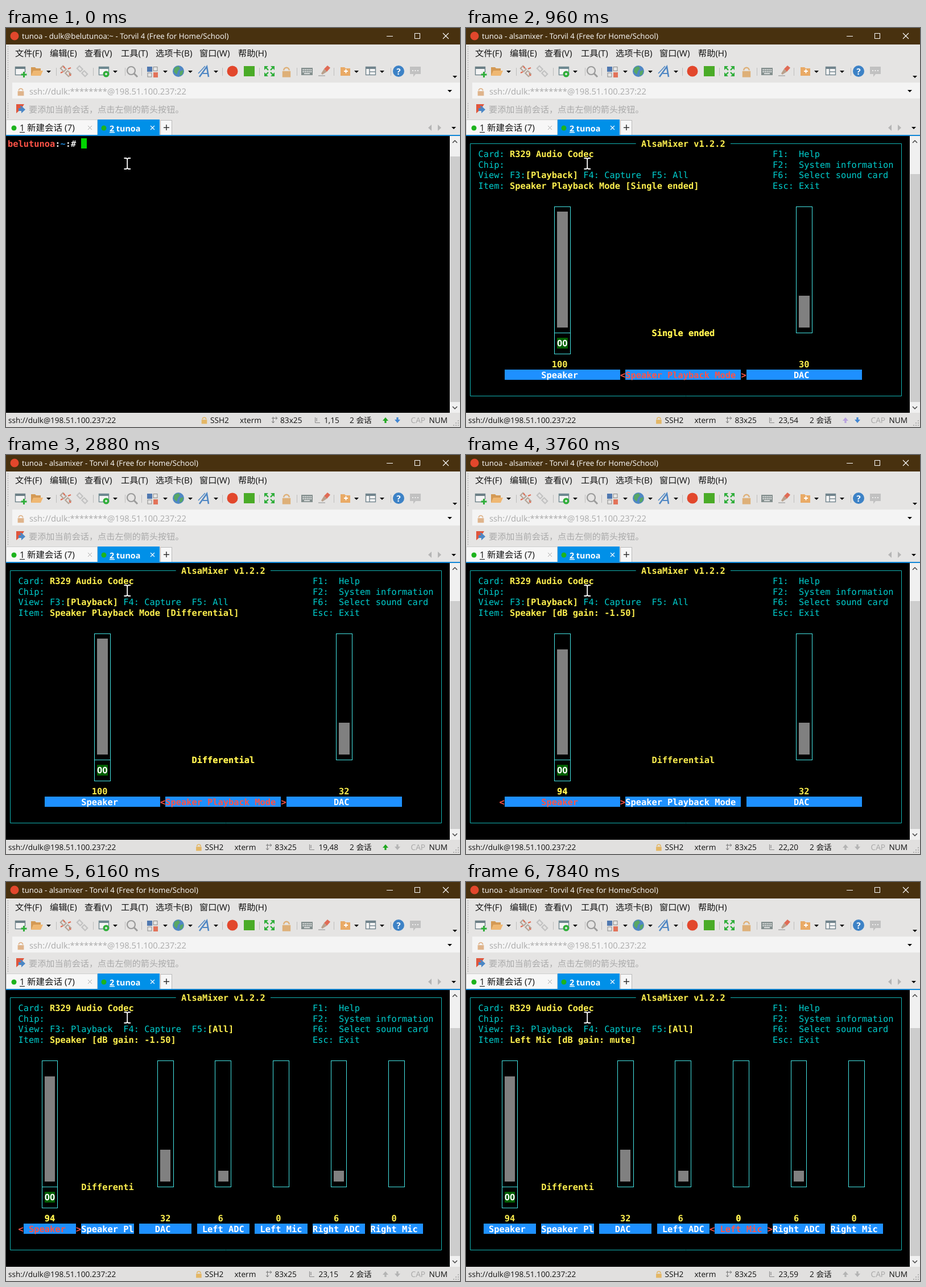
These frames come from a looping animation (798x702 px, 8 s). An HTML page with a canvas:

```html
<!DOCTYPE html>
<html lang="zh-CN">
<head>
<meta charset="utf-8">
<title>Terminal mixer</title>
<style>
html, body { margin: 0; width: 100%; height: 100%; overflow: hidden; background: #000; }
canvas { display: block; }
</style>
</head>
<body>
<canvas id="stage" width="798" height="702"></canvas>
<script>
const g = document.getElementById('stage').getContext('2d');
g.textRendering = 'geometricPrecision';

const LOOP = 8000;
const UI = '"Open Sans", "Noto Sans CJK SC", "Noto Sans CJK", sans-serif';
const MONO = '"DejaVu Sans Mono", monospace';
const USER = 'dulk', HOST = 'belutunoa', SESSION = 'tunoa', ADDR = '198.51.100.237';
const APP = 'Torvil 4 (Free for Home/School)';
const CYAN = '#00cdcd', BAR = '#45e6e6', YELLOW = '#fff04f', RED = '#ff5347', BLUE = '#1e90ff';
const ORANGE = '#e9aa66', GREY = '#8a8a8a', GREEN = '#2fae3a', STEEL = '#4f87c4';

// ---- timeline: each entry is merged over the ones before it ----
const lit = { up: 'green', down: true };
const fade = { up: 'violet', down: true };
const off = { up: '', down: false };
const START = { typed: 0, mixer: false, all: false, sel: 0, speaker: 0, dac: 24, mode: 'Single ended', pos: '1,15', ...lit };
const pick = (sel, pos) => ({ sel, pos: '23,' + pos, ...fade });
const dac = n => ({ dac: n, pos: '22,66', ...lit });
const mode = m => ({ mode: m, pos: '19,48', ...lit });
const EVENTS = [
  [440, { mixer: true, pos: '23,31', ...off }],
  [960, pick(1, 54)], [1080, off],
  [1280, pick(2, 77)], [1360, off],
  [1440, dac(23)], [1520, dac(22)], [1560, off], [1640, dac(21)], [1720, dac(20)], [1760, off],
  [1840, dac(21)], [1920, dac(22)], [2000, { up: '' }], [2040, off],
  [2120, dac(23)], [2200, { up: '' }], [2240, off],
  [2400, pick(1, 54)], [2480, off],
  [2560, mode('Differential')], [2640, off], [2720, mode('Single ended')],
  [2800, mode('Differential')], [2880, { down: false }], [3040, off],
  [3240, pick(0, 31)], [3360, off],
  [3600, { speaker: 1, pos: '22,20', ...lit }], [3680, { speaker: 2 }], [3760, off],
  [5800, { up: 'green' }], [5880, { all: true, pos: '23,15', ...fade }], [6080, { up: '' }], [6160, off],
  [6520, pick(1, 26)], [6640, off], [6800, pick(2, 37)], [6920, off],
  [7480, pick(3, 48)], [7600, off], [7720, pick(4, 59)], [7840, off]
];

function stateAt(t) {
  const s = { ...START };
  for (const [at, change] of EVENTS) if (t >= at) Object.assign(s, change);
  if (t < 440) {
    s.typed = Math.min(9, Math.floor(t / 40));
    s.pos = '1,' + (15 + s.typed);
  }
  return s;
}

// ---- drawing helpers ----
function rect(x, y, w, h, c) { g.fillStyle = c; g.fillRect(x, y, w, h); }
function box(x, y, w, h, c, lw = 1) { g.strokeStyle = c; g.lineWidth = lw; g.strokeRect(x, y, w, h); }
function disc(x, y, r, c) { g.fillStyle = c; g.beginPath(); g.arc(x, y, r, 0, 7); g.fill(); }
function ring(x, y, r, c, lw) { g.strokeStyle = c; g.lineWidth = lw; g.beginPath(); g.arc(x, y, r, 0, 7); g.stroke(); }
function trace(p) {
  g.beginPath();
  for (let i = 0; i < p.length; i += 2) g.lineTo(p[i], p[i + 1]);
}
function line(c, lw, ...p) { trace(p); g.strokeStyle = c; g.lineWidth = lw; g.stroke(); }
function poly(c, ...p) { trace(p); g.fillStyle = c; g.fill(); }
function label(s, x, y, size, c, weight = 400) {
  g.font = `${weight} ${size}px ${UI}`;
  g.fillStyle = c;
  g.fillText(s, x, y);
}
function drop(x, y = 77) { poly('#000', x - 4, y - 2, x + 4, y - 2, x, y + 2); }
function lock(x, y, k, c) {
  rect(x - 6 * k, y - 1 * k, 12 * k, 9 * k, c);
  g.strokeStyle = c; g.lineWidth = 2 * k;
  g.beginPath(); g.arc(x, y - 2 * k, 4 * k, Math.PI, 0); g.stroke();
}
function folder(x, c) {
  poly(c, x - 10, 69, x - 3, 69, x - 1, 71, x + 7, 71, x + 7, 84, x - 10, 84);
}
function pane(x, c) {
  rect(x - 9, 68, 18, 15, '#f4f4f4');
  box(x - 8.5, 68.5, 17, 14, c, 1.4);
  rect(x - 9, 68, 18, 4, c);
}
function chain(x, c) {
  g.save(); g.translate(x, 76); g.rotate(Math.PI / 4);
  box(-10, -3, 8, 6, c, 2.2); box(2, -3, 8, 6, c, 2.2);
  g.restore();
}

// ---- terminal grid ----
const CW = 9.24, RH = 18.5;
const colX = c => 3 + c * CW;
const rowY = r => 203 + r * RH;
const snap = v => Math.floor(v) + 0.5;

function put(s, c, r, color, bold = true) {
  g.font = `${bold ? 'bold ' : ''}15.35px ${MONO}`;
  g.fillStyle = color;
  [...s].forEach((ch, i) => ch !== ' ' && g.fillText(ch, colX(c + i), rowY(r) + 5.5));
}
function cells(c, r, w, h, color) {
  const x = Math.round(colX(c)), y = Math.round(rowY(r) - RH / 2);
  rect(x, y, Math.round(colX(c + w)) - x, Math.round(rowY(r + h) - RH / 2) - y, color);
}

// ---- window chrome ----
function header(title) {
  rect(0, 0, 798, 29, '#48310f');
  disc(15, 14, 7.5, '#e2472c');
  label(title, 28, 18.7, 13.3, '#fff');
  line('#fff', 1, 669, 14.5, 680, 14.5);
  box(718.5, 9.5, 9, 9, '#fff');
  line('#fff', 1.1, 768, 9, 778, 19);
  line('#fff', 1.1, 778, 9, 768, 19);

  rect(0, 29, 798, 161, '#e5e4e3');
  [['文件(F)', 16], ['编辑(E)', 77], ['查看(V)', 138], ['工具(T)', 202],
   ['选项卡(B)', 263], ['窗口(W)', 340], ['帮助(H)', 408]]
    .forEach(([s, x]) => label(s, x, 50, 15.2, '#111'));
  for (let y = 32; y < 158; y += 4) if (y < 92 || y > 128) rect(3, y, 1, 2, '#aaa');
}

function toolbar() {
  for (const x of [88, 153, 209, 238, 380, 445, 511, 576, 676]) rect(x, 70, 1, 14, '#bdbdbd');
  for (const x of [75, 192, 280, 324, 369, 616, 661]) drop(x);
  drop(789, 86);

  pane(25, '#6b7f86');
  rect(27, 78, 9, 9, '#e5e4e3'); rect(30, 77, 3, 10, GREEN); rect(26.5, 80.5, 10, 3, GREEN);
  folder(54, '#d49a55');
  poly('#efb873', 48, 75, 65, 75, 61, 84, 44, 84);
  chain(105, '#b5a79b');
  line('#e26a52', 2, 101, 67, 103, 71); line('#e26a52', 2, 111, 80, 114, 84);
  line('#e26a52', 2, 96, 79, 100, 77); line('#e26a52', 2, 109, 72, 114, 70);
  chain(134, '#c2c2c2');
  pane(172, '#6d8890');
  disc(176, 81, 5.5, GREEN); disc(176, 81, 2, '#e5e4e3');
  ring(220, 75, 7, '#9b9b9b', 2.2); line('#9b9b9b', 3, 225, 80, 231, 86);
  rect(248, 68, 9, 9, '#4f78b0'); box(249, 79, 7, 7, GREY); box(259, 68.5, 7, 7, GREY);
  rect(259, 78, 8, 9, '#e2735a');
  disc(303, 76, 10, STEEL);
  poly('#58a765', 296, 70, 303, 67, 306, 71, 302, 76, 300, 82, 295, 77);
  poly('#58a765', 306, 76, 312, 74, 310, 82, 305, 84);
  line(STEEL, 2.6, 340, 86, 353, 68, 356, 86); line(STEEL, 2, 346, 80, 355, 80);
  line(STEEL, 1.5, 338, 80, 350, 67);
  disc(398, 76, 9.5, '#e2472c');
  rect(418, 67, 19, 18, '#4aab27');

  for (const sx of [-1, 1]) for (const sy of [-1, 1]) {
    const x = 463 + sx * 9, y = 76 + sy * 9;
    poly(GREEN, x, y, x - sx * 7, y, x, y - sy * 7);
    line(GREEN, 2.4, x - sx, y - sy, x - sx * 7, y - sy * 7);
  }
  lock(493, 77, 1.2, '#deb078');
  rect(519, 70, 20, 13, '#85908f');
  for (let i = 0; i < 10; i++) rect(521.5 + i % 5 * 3.4, 72.5 + Math.floor(i / 5) * 3.5, 2, 2, '#f4f4f4');
  rect(524, 79.5, 10, 1.6, '#f4f4f4');
  poly('#e06b55', 559, 72, 565, 66, 570, 70, 564, 77);
  poly('#b9a08c', 559, 72, 564, 77, 556, 82, 554, 80);
  line('#aaa', 1.5, 549, 84, 561, 84);
  folder(598, ORANGE); rect(594, 75, 7, 2, '#fff'); rect(596.5, 72.5, 2, 7, '#fff');
  pane(641, '#71848d'); line('#71848d', 1.4, 639, 70, 639, 83); line('#71848d', 1.4, 639, 77, 649, 77);
  disc(690, 76, 10, '#3d82c6');
  label('?', 686.5, 82, 15, '#fff', 700);
  poly('#c1c1c1', 710, 68, 729, 68, 729, 81, 720, 81, 716, 86, 716, 81, 710, 81);
  for (let i = 0; i < 3; i++) rect(714 + i * 4.5, 74, 2, 2, '#eee');
}

function bars() {
  rect(11, 96, 787, 28, '#f4f4f4');
  lock(26, 112, 0.9, '#dfb48c');
  label(`ssh://${USER}:********@${ADDR}:22`, 41, 116.5, 14.8, '#aaa');
  drop(780, 111);
  poly('#e0563d', 18, 134, 32, 134, 27, 142, 18, 150);
  poly('#4a87c6', 24, 137, 27, 137, 34, 143.5, 27, 150, 27, 146, 22, 146, 22, 141, 27, 141);
  label('要添加当前会话，点击左侧的箭头按钮。', 40, 148.5, 15.15, '#a9a9a9');

  rect(0, 162, 160, 26, '#f7f7f7');
  box(0.5, 161.5, 160, 27, '#cfcfcf');
  disc(14, 176, 4.5, '#1db31d');
  label('1 新建会话 (7)', 24, 181.3, 15.5, '#111');
  rect(24, 183, 9, 1, '#111');
  line('#aaa', 1, 144, 172, 151, 179); line('#aaa', 1, 151, 172, 144, 179);
  rect(161, 161, 109, 28, '#0090e8');
  disc(172, 176, 4.5, '#1db31d');
  label('2 ' + SESSION, 182, 181.5, 14.3, '#fff', 700);
  rect(182, 183, 9, 1.4, '#fff');
  line('#fff', 1.1, 254, 172, 261, 179); line('#fff', 1.1, 261, 172, 254, 179);
  rect(272, 163, 20, 25, '#f7f7f7'); box(271.5, 162.5, 20, 26, '#bbb');
  rect(277, 174.5, 10, 1.5, '#333'); rect(281.2, 170, 1.5, 10, '#333');
  poly('#b5b5b5', 748, 170, 748, 181, 742, 175.5);
  poly('#b5b5b5', 759, 170, 759, 181, 765, 175.5);
  drop(787, 176);
  rect(0, 188, 798, 2, '#0f86d6');
}

function scrollbar(top) {
  rect(780, 190, 18, 487, '#f0f0f0');
  rect(781, top, 17, 658 - top, '#cdcdcd');
  line('#444', 1.5, 785, 202, 789, 198, 793, 202);
  line('#444', 1.5, 785, 666, 789, 670, 793, 666);
}

function arrow(x, dir, c) {
  const y = 690;
  poly(c, x, y - 5 * dir, x + 5, y + dir, x + 1.6, y + dir, x + 1.6, y + 5 * dir,
    x - 1.6, y + 5 * dir, x - 1.6, y + dir, x - 5, y + dir);
}
function status(s) {
  const dx = s.pos.length > 4 ? -9.6 : 0, y = 695.3, size = 13.7;
  rect(0, 677, 798, 25, '#e1e0df');
  label(`ssh://${USER}@${ADDR}:22`, 4, y, 13.55, '#111');
  lock(348.5 + dx, 690, 0.8, '#e4b765');
  label('SSH2', 359 + dx, y, size, '#111');
  label('xterm', 411 + dx, y, size, '#111');
  const a = Math.round(467 + dx), b = Math.round(543 + dx);
  line('#777', 1, a, 686.5, a + 10, 686.5); line('#777', 1, a + 2.5, 684, a + 2.5, 695);
  line('#777', 1, a + 7, 684, a + 10, 686.5, a + 7, 689); line('#777', 1, a, 692, a + 2.5, 695, a + 5, 692);
  label('83x25', 482 + dx, y, size, '#111');
  line('#888', 1, b + 0.5, 685, b + 0.5, 694.5, b + 9, 694.5); rect(b + 2, 686, 2, 6, '#aaa');
  label(s.pos, 559 + dx, y, size, '#111');
  label('2 会话', 604, y, size, '#111');
  arrow(667, 1, { green: '#20a820', violet: '#b9a2df' }[s.up] || '#b4b4b4');
  arrow(688, -1, s.down ? '#4287d3' : '#b4b4b4');
  label('CAP', 711.5, y, size, '#a6a6a6');
  g.save();
  g.beginPath(); g.rect(740, 677, 36, 25); g.clip();
  label('NUM', 743.5, y, size, '#111');
  g.restore();
  for (let i = 0; i < 3; i++) for (let j = 0; j <= i; j++) rect(794 - j * 4, 690 + i * 4, 2, 2, '#b0b0b0');
}

// ---- terminal content ----
function prompt(typed) {
  put(HOST, 0, 0, RED);
  put(':', 9, 0, '#eee');
  put('~', 10, 0, '#1c86d8');
  put(':#', 11, 0, '#eee');
  put('alsamixer'.slice(0, typed), 14, 0, '#eee', false);
  cells(14 + typed, 0, 1, 1, '#00d400');
}

// Cubic-like loudness curve over a 73.08 dB range.
function dacLevel(n) {
  const floor = 10 ** (-73.08 / 60);
  return (10 ** (-1.16 * n / 60) - floor) / (1 - floor);
}
const gain = db => `[dB gain: ${db}]`;

function channels(s) {
  const level = dacLevel(s.dac);
  const list = [
    { name: 'Speaker', level: 10 ** (-0.75 * s.speaker / 60), mute: true, info: gain(s.speaker ? (-0.75 * s.speaker).toFixed(2) : '0.00') },
    { name: 'Speaker Playback Mode', choice: s.mode, info: `[${s.mode}]` },
    { name: 'DAC', level, info: gain((-1.16 * s.dac).toFixed(2)) }
  ];
  if (s.all) for (const side of ['Left', 'Right']) list.push(
    { name: side + ' ADC', level: dacLevel(48), info: gain('-55.68') },
    { name: side + ' Mic', level: 0, info: gain('mute') });
  return list;
}

function strip(ch, c, w, selected) {
  const name = ch.name.slice(0, w), mid = c + (w - 4) / 2;
  if (ch.choice) {
    const s = ch.choice.slice(0, w);
    put(s, c + Math.floor((w - s.length) / 2), 18, YELLOW);
  } else {
    const x = snap(colX(mid + 0.5)), right = snap(colX(mid + 3.5));
    const top = snap(rowY(6)), base = snap(rowY(18));
    const rows = Math.round(ch.level * 11), pct = String(Math.round(ch.level * 100));
    box(x, top, right - x, base - top, BAR);
    if (rows) cells(mid + 1, 18 - rows, 2, rows, '#808080');
    if (ch.mute) {
      box(x, base, right - x, snap(rowY(20)) - base, BAR);
      cells(mid + 1, 19, 2, 1, '#005f00');
      put('OO', mid + 1, 19, '#fff');
    }
    put(pct, mid + Math.floor((4 - pct.length) / 2), 21, YELLOW);
  }
  cells(c, 22, w, 1, BLUE);
  put(name, c + Math.floor((w - name.length) / 2), 22, selected ? RED : '#fff');
  if (selected) {
    put('<', c - 1, 22, RED);
    put('>', c + w, 22, RED);
  }
}

function mixer(s) {
  const l = snap(colX(0.5)), r = snap(colX(82.5)), t = snap(rowY(0)), b = snap(rowY(24));
  line('#12b4b4', 1, colX(32), t, l, t, l, b, r, b, r, t, colX(50), t);
  put('AlsaMixer v1.2.2', 33, 0, YELLOW);
  ['Card:', 'Chip:', 'View:', 'Item:'].forEach((k, i) => put(k, 2, i + 1, CYAN, false));
  [['F1:', 'Help'], ['F2:', 'System information'], ['F6:', 'Select sound card'], ['Esc:', 'Exit']]
    .forEach(([k, v], i) => { put(k, 58, i + 1, CYAN, false); put(v, 63, i + 1, CYAN, false); });
  put('R329 Audio Codec', 8, 1, YELLOW);
  [['F3:', 'Playback', 8, !s.all], ['F4:', 'Capture', 22, false], ['F5:', 'All', 35, s.all]]
    .forEach(([key, name, c, on]) => {
      put(key, c, 3, CYAN, false);
      put(on ? `[${name}]` : ` ${name}`, c + 3, 3, on ? YELLOW : CYAN, on);
    });

  const list = channels(s), cur = list[s.sel];
  put(`${cur.name} ${cur.info}`, 8, 4, YELLOW);
  const [first, w] = s.all ? [3, 10] : [7, 22];
  list.forEach((ch, i) => strip(ch, first + i * (w + 1), w, false));
  strip(cur, first + s.sel * (w + 1), w, true);
}

function pointer() {
  const beam = (c, lw) => {
    line(c, lw, 207.5, 229, 211.5, 229, 213.2, 230.5, 215, 229, 219, 229);
    line(c, lw, 213.2, 230, 213.2, 247);
    line(c, lw, 207.5, 248, 211.5, 248, 213.2, 246.5, 215, 248, 219, 248);
  };
  beam('#000', 4);
  beam('#fff', 1.8);
}

function draw(t) {
  const s = stateAt(t);
  rect(0, 0, 798, 702, '#000');
  header(`${SESSION} - ${s.mixer ? 'alsamixer' : `${USER}@${HOST}:~`} - ${APP}`);
  toolbar();
  bars();
  if (s.mixer) mixer(s); else prompt(s.typed);
  pointer();
  scrollbar(s.mixer ? 257 : 226);
  status(s);
}

const begin = performance.now();
function tick() {
  draw((performance.now() - begin) % LOOP);
  requestAnimationFrame(tick);
}
tick();
</script>
</body>
</html>
```
